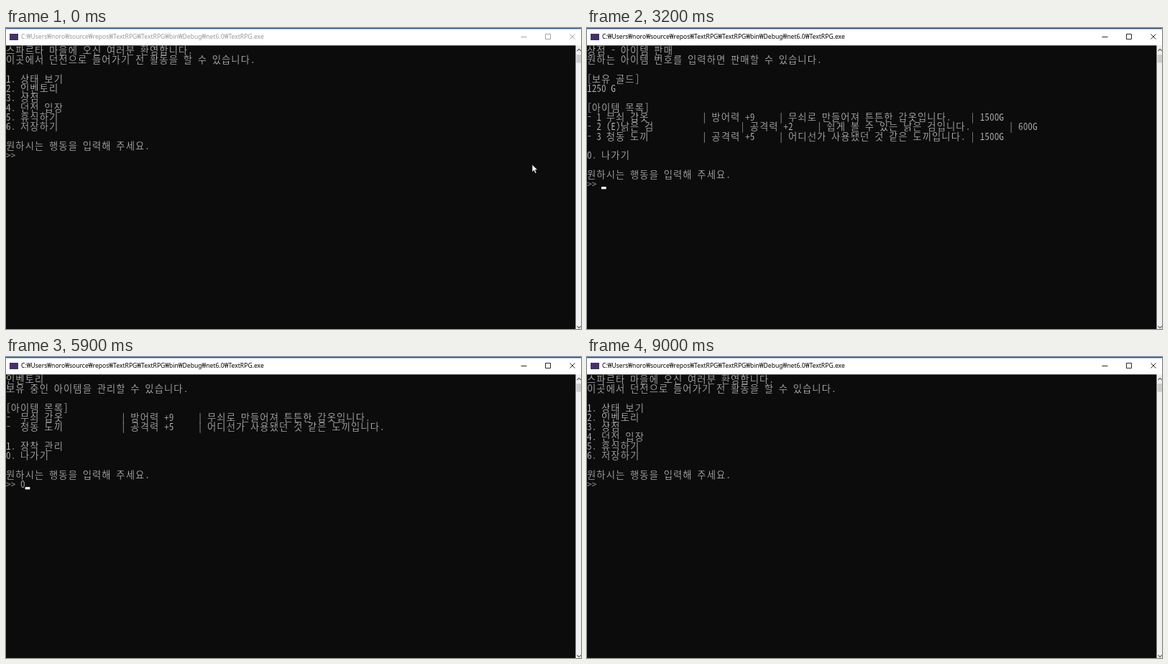
Write an HTML page that moves like this. It is 800 px wide and 419 px high and loops after 9.2 s.

```html
<!DOCTYPE html>
<html lang="ko">
<head>
<meta charset="utf-8">
<style>
html, body { margin: 0; width: 100%; height: 100%; overflow: hidden; background: #0c0c0c; }
svg { display: block; width: 800px; height: 419px; }
#screen {
  font: 300 13.33px "Noto Sans Mono CJK KR", "Noto Sans CJK KR", "Noto Sans CJK", monospace;
  fill: #c0c0c0; stroke: #0c0c0c; stroke-width: 0.22px;
}
#title { font: 8.58px "Noto Sans", "Noto Sans CJK KR", sans-serif; }
</style>
</head>
<body>
<svg viewBox="0 0 800 419">
  <rect width="800" height="419" fill="#0c0c0c"/>
  <g id="screen"></g>
  <rect id="caret" width="6.67" height="3.33" fill="#f4f4f4"/>
  <rect y="1" width="800" height="23.3" fill="#fff"/>
  <rect id="strip" width="800" height="1.4"/>
  <rect x="5" y="8" width="12" height="9" fill="#46306c"/>
  <text id="title" x="21" y="15.3">C:₩Users₩noro₩source₩repos₩TextRPG₩TextRPG₩bin₩Debug₩net6.0₩TextRPG.exe</text>
  <path id="buttons" fill="none" stroke-width="0.9" d="M716.5 12.5h8M750.5 8.5h7v7h-7zM784.5 8.5l7 7M791.5 8.5l-7 7"/>
  <rect x="792.5" y="24" width="7.5" height="395" fill="#f0f0f0"/>
  <rect x="793.5" y="37" width="6.5" height="11.5" fill="#cdcdcd"/>
  <path d="M794.5 32l2.7-2.7 2.7 2.7M794.5 415l2.7 2.7 2.7-2.7" fill="none" stroke="#606060" stroke-width="1.1"/>
  <path id="mouse" d="M0 0v10.6l2.5-2.3 1.7 4 1.9-.8-1.7-3.9h3.3z" fill="#fff" stroke="#111" stroke-width="0.7"/>
</svg>
<script>
const CELL = 20 / 3, LINE = 40 / 3, TOP = 24.3, LOOP = 9200, BLINK = 530;
const $ = id => document.getElementById(id);

// name, stat, description, shop price, resale price
const items = [
  ["(E)수련자 갑옷", "방어력 +5", "수련에 도움을 주는 갑옷입니다.", "구매 완료", "1000G"],
  ["무쇠 갑옷", "방어력 +9", "무쇠로 만들어져 튼튼한 갑옷입니다.", "구매 완료", "1500G"],
  ["스파르타 갑옷", "방어력 +15", "스파르타 전사들이 사용했던 전설의 갑옷입니다.", "3500G"],
  ["(E)낡은 검\t", "공격력 +2", "쉽게 볼 수 있는 낡은 검입니다.", "구매 완료", "600G"],
  ["청동 도끼", "공격력 +5", "어디선가 사용됐던 것 같은 도끼입니다.", "구매 완료", "1500G"],
  ["스파르타 창", "공격력 +7", "스파르타 전사들이 사용했던 전설의 창입니다.", "3500G"],
  ["첫 번째 검", "공격력 +10", "내가 추가한 첫 번째 검입니다.\t", "4000G"],
  ["두 번째 검", "공격력 +15", "내가 추가한 두 번째 검입니다.\t", "5000G"],
  ["첫 번째 갑옷", "방어력 +10", "내가 추가한 첫 번째 갑옷입니다.", "4000G"],
  ["두 번째 갑옷", "방어력 +15", "내가 추가한 두 번째 갑옷입니다.", "5000G"]
];

const row = (mark, [name, stat, info], price) =>
  `- ${mark} ${name}\t\t| ${stat}\t| ${info}` + (price ? `\t| ${price}` : "");
const page = (...lines) => [...lines, "", "원하시는 행동을 입력해 주세요.", ">> "];
const gold = n => ["", "[보유 골드]", n + " G", "", "[아이템 목록]"];
const sell = (n, ids) => page("상점 - 아이템 판매", "원하는 아이템 번호를 입력하면 판매할 수 있습니다.",
  ...gold(n), ...ids.map((id, i) => row(i + 1, items[id], items[id][4])), "", "0. 나가기");

const home = page("스파르타 마을에 오신 여러분 환영합니다.", "이곳에서 던전으로 들어가기 전 활동을 할 수 있습니다.", "",
  "1. 상태 보기", "2. 인벤토리", "3. 상점", "4. 던전 입장", "5. 휴식하기", "6. 저장하기");
const shop = page("상점", "필요한 아이템을 얻을 수 있는 상점입니다.", ...gold(400),
  ...items.map(it => row("", it, it[3])), "", "1. 아이템 구매", "2. 아이템 판매", "0. 나가기");
const bag = page("인벤토리", "보유 중인 아이템을 관리할 수 있습니다.", "", "[아이템 목록]",
  row("", items[1]), row("", items[4]), "", "1. 장착 관리", "0. 나가기");
const status = page("상태 보기", "캐릭터의 정보가 표시됩니다.", "", "Lv. 01", "한도윤 (마법사)",
  "공격력: 10", "방어력: 5", "체력: 100", "Gold: 1760G", "", "0. 나가기");
const sellAll = sell(400, [0, 1, 3, 4]), sellThree = sell(1250, [1, 3, 4]), sellTwo = sell(1760, [1, 4]);

// start time, page, typed key, entered
const steps = [
  [0, home, ""], [300, home, ""], [600, home, "3"],
  [900, shop, ""], [1500, shop, "2"],
  [1800, sellAll, ""], [2600, sellAll, "1"], [2800, sellAll, "1", true],
  [2900, sellThree, ""], [3400, sellThree, "2"], [3600, sellThree, "2", true],
  [3700, sellTwo, ""], [4200, sellTwo, "0"], [4400, sellTwo, "0", true],
  [4600, home, ""], [5100, home, "2"],
  [5400, bag, ""], [5800, bag, "0"], [6000, bag, "0", true],
  [6100, home, ""], [6500, home, "1"],
  [6800, status, ""], [7600, status, "0"],
  [8300, home, ""]
];

// Lay one line out on the console grid: wide Hangul, tab stops every 8 cells.
function lineMarkup(line, n) {
  let col = 0, chars = "";
  const xs = [];
  for (const ch of line) {
    if (ch === "\t") { col = (Math.floor(col / 8) + 1) * 8; continue; }
    if (ch !== " ") {
      chars += ch === ">" ? "&gt;" : ch;
      xs.push((col * CELL).toFixed(2));
    }
    col += ch >= "가" && ch <= "힣" ? 2 : 1;
  }
  return chars && `<text x="${xs.join(" ")}" y="${(TOP + n * LINE + 11.3).toFixed(2)}">${chars}</text>`;
}

let shown = null;
function drawPage(step) {
  if (step === shown) return;
  shown = step;
  const [, lines, key] = step, last = lines.length - 1;
  $("screen").innerHTML = lines.map((s, i) => lineMarkup(i === last ? s + key : s, i)).join("");
}

function draw(t) {
  const step = steps.findLast(s => s[0] <= t);
  const [start, lines, key, entered] = step;
  drawPage(step);

  const active = t >= 300;
  $("title").setAttribute("fill", active ? "#000" : "#999");
  $("buttons").setAttribute("stroke", active ? "#111" : "#999");
  $("strip").setAttribute("fill", active ? "#1b4a8c" : "#1a5cab");

  const on = active && (t - start) % (2 * BLINK) < BLINK;
  const col = entered ? 0 : 3 + key.length;
  const bottom = TOP + (lines.length + (entered ? 1 : 0)) * LINE;
  $("caret").setAttribute("x", col * CELL);
  $("caret").setAttribute("y", bottom - 3.33);
  $("caret").setAttribute("visibility", on ? "visible" : "hidden");

  const p = Math.min(1, Math.max(0, (t - 100) / 400)), e = p * p * (3 - 2 * p);
  $("mouse").setAttribute("transform", `translate(${732 + 3 * e} ${190 + 18 * e})`);
  $("mouse").setAttribute("visibility", t < 600 ? "visible" : "hidden");
}

const began = performance.now();
function tick() {
  draw((performance.now() - began) % LOOP);
  requestAnimationFrame(tick);
}
tick();
</script>
</body>
</html>
```
